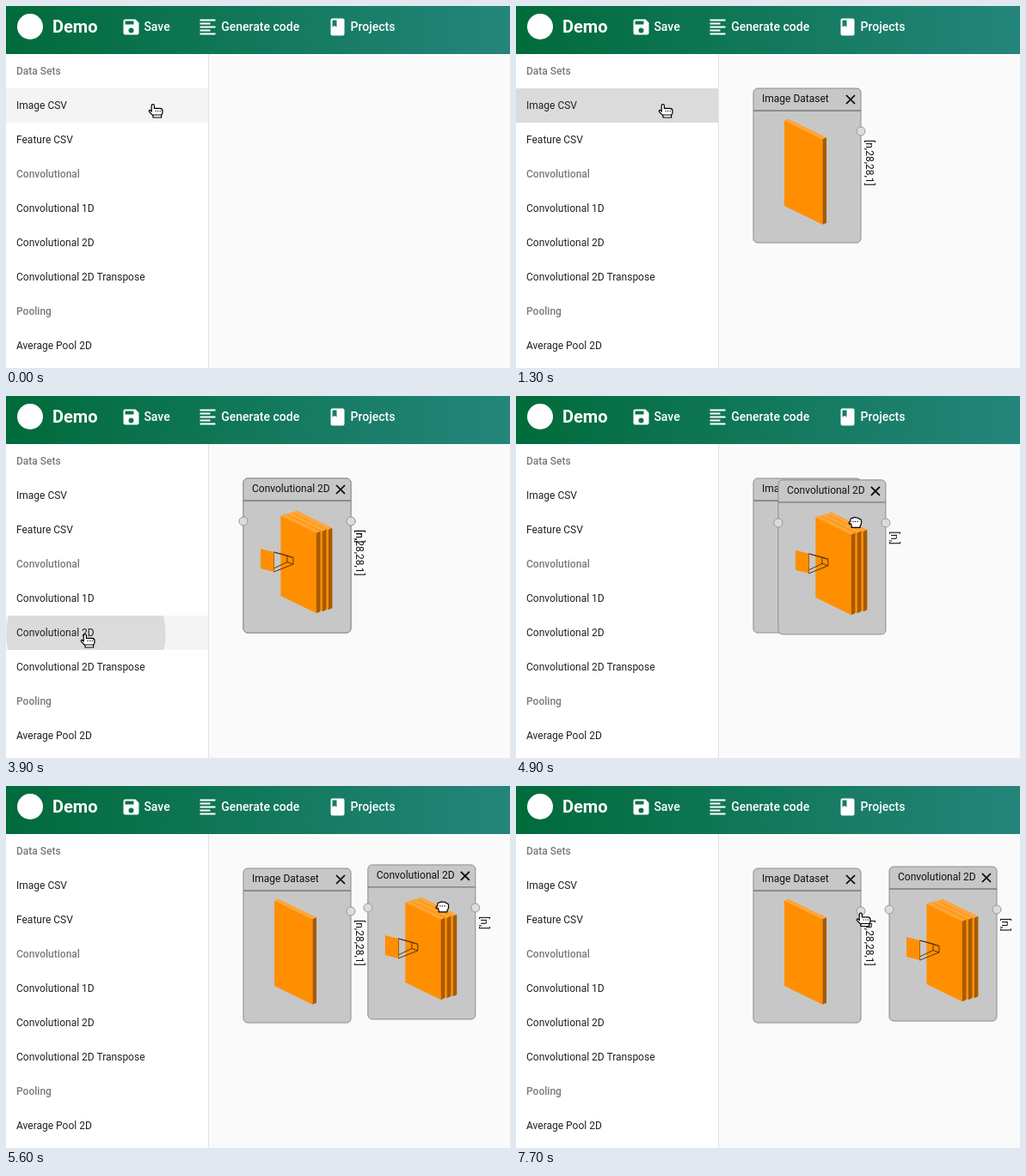
Recreate the animation shown at these times as an HTML page. Size 586 by 422 pixels, loop 8 s.

```html
<!DOCTYPE html>
<html lang="en">
<head>
<meta charset="utf-8">
<title>Model builder</title>
<style>
html, body { margin: 0; width: 100%; height: 100%; overflow: hidden; background: #fafafa; }
svg { display: block; width: 586px; height: 422px; }
text { font-family: Roboto, sans-serif; font-size: 12px; fill: #212121; }
.head { fill: #7a7a7a; font-weight: 500; }
.bar { font-size: 14px; font-weight: 500; fill: #fff; }
.brand { font-size: 20px; font-weight: 700; fill: #fff; }
.node text { fill: #111; }
</style>
</head>
<body>
<svg viewBox="0 0 586 422" xmlns="http://www.w3.org/2000/svg">
  <defs>
    <linearGradient id="grad"><stop offset="0" stop-color="#006b3b"/><stop offset="1" stop-color="#24857b"/></linearGradient>
    <clipPath id="clip"><rect id="clipRow" width="235" height="40"/></clipPath>
  </defs>
  <rect width="586" height="422" fill="#fafafa"/>
  <rect width="235" height="422" fill="#fff"/>
  <rect x="235" width="1" height="422" fill="#e2e2e2"/>
  <rect id="hover" width="235" height="40" fill="#f4f4f4"/>
  <g clip-path="url(#clip)"><circle id="ripple" fill="#000"/></g>
  <g id="list"></g>
  <rect width="586" height="56" fill="url(#grad)"/>
  <circle cx="28" cy="24" r="15" fill="#fff"/>
  <text class="brand" x="54" y="30.5">Demo</text>
  <g fill="#fff">
    <path transform="translate(133.5 12.5)" d="M17 3H5a2 2 0 0 0-2 2v14a2 2 0 0 0 2 2h14a2 2 0 0 0 2-2V7zM12 19a3 3 0 1 1 0-6a3 3 0 0 1 0 6zM15 9H5V5h10z"/>
    <path transform="translate(222.5 12.5)" d="M3 3h18v2H3zM3 7h12v2H3zM3 11h18v2H3zM3 15h12v2H3zM3 19h18v2H3z"/>
    <path transform="translate(373.5 12.5)" d="M18 2H6a2 2 0 0 0-2 2v16a2 2 0 0 0 2 2h12a2 2 0 0 0 2-2V4a2 2 0 0 0-2-2zM6 4h5v8l-2.5-1.5L6 12z"/>
  </g>
  <text class="bar" x="160.4" y="29">Save</text>
  <text class="bar" x="250.2" y="29">Generate code</text>
  <text class="bar" x="400.6" y="29">Projects</text>
  <g id="image" class="node"></g>
  <g id="conv" class="node"></g>
  <g id="cursor" stroke="#000" stroke-width="1.2" stroke-linejoin="round" fill="#fff">
    <g id="hand">
      <path d="M-4.8-5.8a1.6 1.6 0 0 1 3.2 0V-2.6H5.2Q8-2.4 8 .2V2Q8 4 6.6 5V8H-3V5.8L-7.3 1.6Q-8.4-.6-6.4-.6L-4.8 1Z"/>
      <path d="M-3 5H6.6" stroke-width="1"/>
      <path d="M-.5.5H6" stroke-dasharray="1.2 1.4"/>
    </g>
    <g id="fist">
      <path d="M-5.4-3Q-5-5.6-2.8-4.9Q-1-6.8 1-5.4Q3.6-6.2 4.6-4.2Q7.4-4.2 7.3-1.4V1Q7 3 5.8 4V6H-4V4Q-5-.1-6.6 2Q-8-.6-5.4-1Z"/>
      <path d="M-3-1H5" stroke-dasharray="1.2 1.4"/>
    </g>
  </g>
</svg>
<script>
const LOOP = 8000, STEP = 100, ROW = 40, TOP = 56, SIDE = 235;
const $ = id => document.getElementById(id);
const set = (id, attrs) => { for (const k in attrs) $(id).setAttribute(k, attrs[k]); };
const show = (id, on) => set(id, { visibility: on ? 'visible' : 'hidden' });

const rows = ['#Data Sets', 'Image CSV', 'Feature CSV', '#Convolutional', 'Convolutional 1D',
  'Convolutional 2D', 'Convolutional 2D Transpose', '#Pooling', 'Average Pool 2D'];
$('list').innerHTML = rows.map((s, i) =>
  `<text x="12" y="${TOP + ROW * i + 24}"${s[0] === '#' ? ' class="head"' : ''}>${s.replace('#', '')}</text>`).join('');

const port = x => `<circle cx="${x}" cy="146" r="5" fill="#dcdcdc" stroke="#999"/>`;

// Upright plate seen from the left: front, lit top edge, shaded right edge
function slab(x, y, w, h) {
  const drop = w * .49, d = 4.5;
  return `<g transform="translate(${x} ${y})">
    <path fill="#ff8f00" d="M0 0L${w} ${drop}v${h}L0 ${h}z"/>
    <path fill="#ffa637" d="M0 0l${d}-2l${w} ${drop}l-${d} 2z"/>
    <path fill="#a85a00" d="M${w} ${drop}l${d}-2v${h}l-${d} 2z"/></g>`;
}

function node(title, label, art, hasInput) {
  return `<rect x="276" y="96" width="125" height="180" rx="5" fill="#c7c7c7" stroke="#8c8c8c"/>
    <path d="M276 122H401" stroke="#787878" stroke-width="1.4"/>
    <text x="286" y="112">${title}</text>
    <path d="M384 104l10 10m0-10l-10 10" stroke="#000" stroke-width="1.7"/>
    ${art}${hasInput ? port(276) : ''}${port(401)}
    <text transform="translate(406.7 156) rotate(90)">${label}</text>`;
}

const stack = [2, 1, 0].map(i => slab(319.4 + 7 * i, 139.5 - 2 * i, 41.5, 93.5)).join('');
const kernel = `<g fill="none" stroke="#5e3300">
  <path d="M311.5 182L334 188.5V196L311.5 205zM311.5 182L327 186L334 188.5M311.5 201L327 193.5L334 196M327 186V193.5"/>
  <path d="M296 178l15.5 4v23l-15.5-4z" fill="#ff8f00" stroke="none"/></g>`;

$('image').innerHTML = node('Image Dataset', '[n,28,28,1]', slab(312, 133.5, 44.5, 99.5), false);
$('conv').innerHTML = node('Convolutional 2D', '[n,]', stack + kernel, true);

const span = (t, a, b) => Math.min(1, Math.max(0, (t - a) / (b - a)));
const smooth = u => u * u * (3 - 2 * u);
const rowAt = y => Math.floor((y - TOP) / ROW);

// Glide from p through legs of [start, end, x, y]
const follow = (p, legs, t) => legs.reduce(([px, py], [a, b, x, y]) => {
  const u = smooth(span(t, a, b));
  return [px + (x - px) * u, py + (y - py) * u];
}, p);

const GRAB = 4770, RELEASE = 6700;
const toNode = [[1800, 2400, 125, 165], [2700, 3400, 95, 285], [4600, GRAB, 360, 145.5]];
const toPort = [[6800, 7100, 470, 243], [7100, 7400, 414, 153], [7500, 7700, 404, 155.5]];

// Quick pull to the right that slows down, wavers and settles a little lower
function drag(t) {
  const u = span(t, GRAB, 5750), settle = smooth(span(t, 5800, 6600));
  const waver = Math.sin(Math.PI * span(t, 5800, 6400));
  return [155 * (1 - (1 - u) ** 1.45) + 3 * settle - 4 * waver,
    2 * (1 - (1 - u) ** 20) - 10 * u ** 3 + 6 * settle];
}

// The node trails the hand slightly
function cursorAt(t) {
  const [x, y] = follow([174, 122], toNode, t), [dx, dy] = drag(t + 25);
  return follow([x + (t < GRAB ? 0 : dx), y + (t < GRAB ? 0 : dy)], toPort, t);
}

// cubic-bezier(0, 0, .2, 1)
function decelerate(x) {
  let lo = 0, hi = 1;
  for (let i = 0; i < 20; i++) {
    const s = (lo + hi) / 2;
    if (.6 * s * s + .4 * s ** 3 < x) lo = s; else hi = s;
  }
  return smooth(lo);
}

const clicks = [865, 3765];

function drawRipple(t) {
  const start = clicks.find(c => t >= c && t < c + 850);
  show('ripple', start !== undefined);
  if (start === undefined) return;
  const [hx, hy] = cursorAt(start), cx = hx - 2, cy = hy - 8;
  const y = TOP + ROW * rowAt(cy), age = t - start;
  const reach = Math.hypot(Math.max(cx, SIDE - cx), Math.max(cy - y, y + ROW - cy));
  set('clipRow', { y });
  set('ripple', { cx, cy, r: reach * decelerate(span(age, 0, 450)), opacity: .1 * (1 - span(age, 450, 850)) });
}

function draw(t) {
  const [x, y] = cursorAt(t), [dx, dy] = drag(t);
  const row = rowAt(y - 8), held = t >= GRAB && t < RELEASE;
  show('hover', x < SIDE && rows[row] && rows[row][0] !== '#');
  set('hover', { y: TOP + ROW * row });
  drawRipple(t);
  show('image', t >= 1000);
  show('conv', t >= 3900);
  set('conv', { transform: `translate(${dx} ${dy})` });
  set('cursor', { transform: `translate(${x} ${y})` });
  show('hand', !held);
  show('fist', held);
}

function tick() {
  const t = performance.now() % LOOP;
  draw(Math.floor(t / STEP) * STEP);
  requestAnimationFrame(tick);
}
tick();
</script>
</body>
</html>
```
